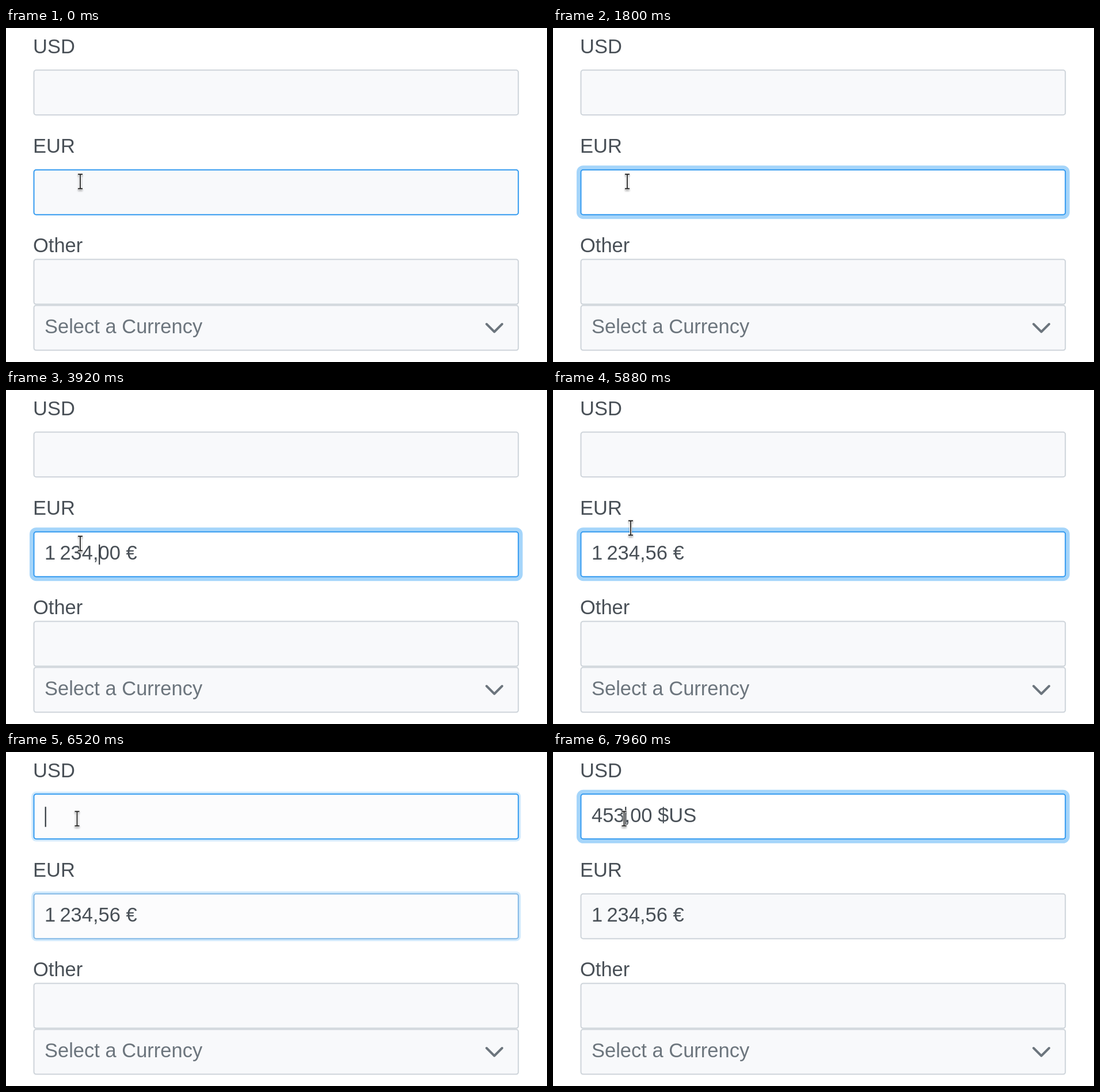
An HTML page that plays this animation: 940x581 px, repeating every 8 s.

```html
<!DOCTYPE html>
<html lang="en">
<head>
<meta charset="utf-8">
<title>Currency inputs</title>
<style>
  html, body { margin: 0; width: 100%; height: 100%; overflow: hidden; background: #fff; }
  svg { display: block; width: 940px; height: 581px; }
  text { font: 34.5px "Liberation Sans", Arial, sans-serif; fill: #495057; }
  .box { fill: #f8f9fb; stroke: #ced4da; stroke-width: 2; }
  .ring { fill: #a5d5fa; }
  .caret { fill: #343a40; }
  .placeholder { fill: #6c757d; }
  #pointer { fill: none; filter: drop-shadow(0 2px 1.5px #0005); }
</style>
</head>
<body>
<svg viewBox="0 0 940 581">
  <text x="47" y="43.5">USD</text>
  <text x="47" y="217">EUR</text>
  <text x="47" y="390">Other</text>
  <g id="fields"></g>
  <text class="placeholder" x="67" y="531">Select a Currency</text>
  <path d="M835 515l13.5 13.5L862 515" fill="none" stroke="#6c757d" stroke-width="4" stroke-linecap="round" stroke-linejoin="round"/>
  <g id="pointer">
    <path d="M-4-12.5H4M-4 12.5H4M0-12.5V12.5" stroke="#fff" stroke-width="4"/>
    <path d="M-4-12.5H4M-4 12.5H4M0-12.5V12.5" stroke="#222" stroke-width="1.8"/>
  </g>
</svg>
<script>
const LOOP = 8000, STEP = 40, FONT = 34.5, RING = 6.5;
const LEFT = 47.5, WIDTH = 843.7, HEIGHT = 80, OFF = -1;
const GREY = [206, 212, 218], BLUE = [51, 154, 240];
const PALE = [248, 249, 251], WHITE = [255, 255, 255];

// [time, value, characters before the caret]; "|" is a narrow space
const usdTyping = [
  [0, '', OFF], [6400, '', 0],
  [7600, '4,00 $US', 1], [7760, '45,00 $US', 2], [7960, '453,00 $US', 3]
];
const eurTyping = [
  [0, '', OFF], [680, '', 0], [1800, '', OFF],
  [1960, '1,00 €', 1], [2120, '12,00 €', 2], [2520, '123,00 €', 3],
  [2800, '1|234,00 €', 5], [3040, '1|234,00 €', OFF],
  [3920, '1|234,00 €', 6], [4240, '1|234,00 €', OFF],
  [4600, '1|234,50 €', 7], [4800, '1|234,56 €', 8], [5440, '1|234,56 €', OFF]
];
// [time, x, y]
const pointerPath = [
  [0, 129, 267], [5840, 129, 267], [5880, 135, 240],
  [6200, 129, 137], [6240, 123.5, 116], [LOOP, 123.5, 116]
];

const lerp = (a, b, p) => a + (b - a) * p;
const mix = (a, b, p) => `rgb(${a.map((v, i) => Math.round(lerp(v, b[i], p)))})`;
const ramp = (t, start, end) => Math.min(1, Math.max(0, (t - start) / (end - start)));
const ease = p => p * p * (3 - 2 * p);
const set = (el, attrs) => { for (const k in attrs) el.setAttribute(k, attrs[k]); };
const latest = (list, t) => list.filter(s => s[0] <= t).pop();
const advance = { '|': 0.21, ',': 0.278 };
const textWidth = s => [...s].reduce((w, c) => w + (advance[c] ?? 0.556) * FONT, 0);

function addField(y) {
  const group = document.createElementNS('http://www.w3.org/2000/svg', 'g');
  group.innerHTML = `<rect class="ring"/>
    <rect class="box" x="${LEFT + 1}" y="${y + 1}" width="${WIDTH - 2}" height="${HEIGHT - 2}" rx="4"/>
    <text x="67" y="${y + 49.5}"></text>
    <rect class="caret" y="${y + 23}" width="2.2" height="35"/>`;
  document.getElementById('fields').append(group);
  const [ring, box, text, caret] = group.children;
  return { y, ring, box, text, caret };
}

function drawField(f, focus, border, typing) {
  const grow = RING * focus;
  set(f.ring, {
    x: LEFT - grow, y: f.y - grow, rx: 5 + grow, opacity: focus,
    width: WIDTH + 2 * grow, height: HEIGHT + 2 * grow
  });
  f.box.style.fill = mix(PALE, WHITE, focus);
  f.box.style.stroke = mix(GREY, BLUE, border);
  const [, value, pos] = typing;
  const [head, tail] = value.split('|');
  f.text.innerHTML = tail ? `${head}<tspan dx="${advance['|'] * FONT}">${tail}</tspan>` : head;
  set(f.caret, {
    x: 67.6 + textWidth(value.slice(0, Math.max(0, pos))),
    visibility: pos === OFF ? 'hidden' : 'visible'
  });
}

const usd = addField(72.3), eur = addField(245.7);
[401.6, 481.6].forEach(y => set(addField(y).caret, { visibility: 'hidden' }));
const pointer = document.getElementById('pointer');

function draw(t) {
  const swap = ease(ramp(t, 6400, 6640));
  drawField(usd, swap, ramp(t, 6160, 6240), latest(usdTyping, t));
  drawField(eur, ease(ramp(t, 640, 840)) * (1 - swap), 1 - swap, latest(eurTyping, t));
  const i = pointerPath.findIndex(p => p[0] > t);
  const a = pointerPath[i - 1], b = pointerPath[i], p = ramp(t, a[0], b[0]);
  set(pointer, { transform: `translate(${lerp(a[1], b[1], p)} ${lerp(a[2], b[2], p)})` });
}

function tick() {
  draw(Math.floor(performance.now() % LOOP / STEP) * STEP);
  requestAnimationFrame(tick);
}
tick();
</script>
</body>
</html>
```
